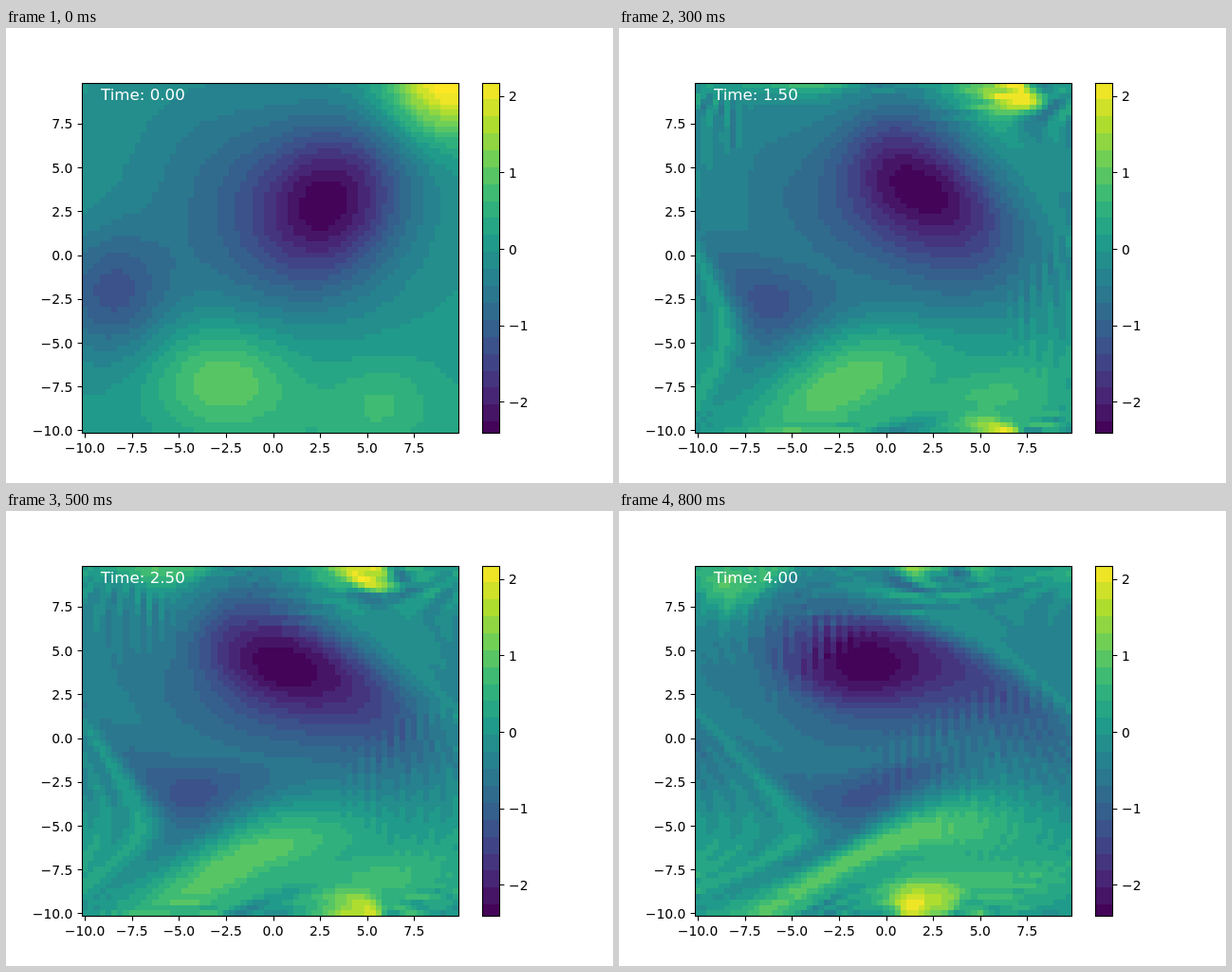
Write an HTML page with a canvas that moves like this. It is 640x480 px and loops after 900 ms.

```html
<!DOCTYPE html>
<html lang="en">
<head>
<meta charset="utf-8">
<title>Vorticity field</title>
<style>
  html, body { margin: 0; width: 100%; height: 100%; overflow: hidden; background: #fff; }
  canvas, svg { position: absolute; left: 0; top: 0; width: 640px; height: 480px; }
  text { font-family: "DejaVu Sans", sans-serif; font-size: 13.89px; }
  #time { font-size: 16.67px; fill: #fff; }
</style>
</head>
<body>
<canvas id="field" width="640" height="480"></canvas>
<svg id="axes" viewBox="0 0 640 480">
  <g fill="none" stroke="#000" stroke-width="1.11">
    <rect x="80.5" y="58.5" width="397" height="369"/>
    <rect x="502.5" y="58.5" width="18" height="369"/>
    <path id="ticks"/>
  </g>
  <g id="labels"></g>
  <text id="time" x="100" y="76"></text>
</svg>
<script>
const N = 64, L = 20, H = L / N, SIZE = N * N;
const VISCOSITY = 0.001;
const FRAME_MS = 100, FRAMES = 9, FRAME_TIME = 0.5, SUBSTEPS = 8;
const BOX = { left: 80, top: 57.6, right: 476.8, bottom: 427.2 };
const VMIN = -2.41, VMAX = 2.175;
const BAND = 0.222, BAND_START = VMIN + 0.149;

const vortex = (strength, x, y, sx, sy = sx) => (px, py) =>
  strength * Math.exp(-(((px - x) / sx) ** 2 + ((py - y) / sy) ** 2) / 2);

const VORTICES = [
  vortex(-1.15, 2.5, 1.8, 2.6),
  vortex(-1.15, 3.9, 4.6, 2.6),
  vortex(-0.75, -0.5, 1, 4.5),
  vortex(-0.3, -3, 6, 3.5),
  vortex(-1.15, -8.6, -2.2, 2.1, 2.5),
  vortex(1.05, -2.8, -6.9, 2.6, 2.2),
  vortex(0.4, 4, -9, 5, 3),
  vortex(0.33, 5.8, -8.4, 1.6),
  vortex(2.4, 9.3, 10, 2.2)
];

function initialField() {
  return Float64Array.from({ length: SIZE }, (_, i) => {
    const x = (i % N) * H - L / 2, y = (i >> 6) * H - L / 2;
    return VORTICES.reduce((sum, f) => sum + f(x, y), 0);
  });
}

// In-place radix-2 transform of N entries with the given offset and stride
function fft(re, im, offset, stride) {
  const swap = (f, a, b) => { const t = f[a]; f[a] = f[b]; f[b] = t; };
  for (let i = 1, j = 0; i < N; i++) {
    let bit = N >> 1;
    for (; j & bit; bit >>= 1) j ^= bit;
    j ^= bit;
    if (i < j) {
      swap(re, offset + i * stride, offset + j * stride);
      swap(im, offset + i * stride, offset + j * stride);
    }
  }
  for (let half = 1; half < N; half *= 2) {
    for (let k = 0; k < half; k++) {
      const c = Math.cos(Math.PI * k / half), s = -Math.sin(Math.PI * k / half);
      for (let i = k; i < N; i += 2 * half) {
        const a = offset + i * stride, b = a + half * stride;
        const tr = re[b] * c - im[b] * s, ti = re[b] * s + im[b] * c;
        re[b] = re[a] - tr; im[b] = im[a] - ti;
        re[a] += tr; im[a] += ti;
      }
    }
  }
}

function fft2(re, im) {
  for (let i = 0; i < N; i++) fft(re, im, i * N, 1);
  for (let i = 0; i < N; i++) fft(re, im, i, N);
}

// Periodic Poisson solve for the stream function
function streamFunction(w) {
  const re = w.slice(), im = new Float64Array(SIZE);
  const wave = i => 2 * Math.PI / L * (i < N / 2 ? i : i - N);
  fft2(re, im);
  for (let i = 0; i < SIZE; i++) {
    const k2 = wave(i % N) ** 2 + wave(i >> 6) ** 2;
    const scale = k2 ? -1 / (k2 * SIZE) : 0;
    re[i] *= scale;
    im[i] *= scale;
  }
  fft2(im, re); // swapped parts give the inverse
  return re;
}

// Advection and diffusion with second-order central differences
function rate(w) {
  const psi = streamFunction(w), out = new Float64Array(SIZE);
  for (let y = 0; y < N; y++) {
    const row = y * N, up = ((y + 1) % N) * N, down = ((y + N - 1) % N) * N;
    for (let x = 0; x < N; x++) {
      const e = row + (x + 1) % N, o = row + (x + N - 1) % N, n = up + x, s = down + x;
      const i = row + x;
      const turn = (psi[e] - psi[o]) * (w[n] - w[s]) - (psi[n] - psi[s]) * (w[e] - w[o]);
      const spread = w[e] + w[o] + w[n] + w[s] - 4 * w[i];
      out[i] = (turn / 4 + VISCOSITY * spread) / (H * H);
    }
  }
  return out;
}

function rungeKutta(w, dt) {
  const shift = (k, s) => w.map((v, i) => v + s * k[i]);
  const a = rate(w);
  const b = rate(shift(a, dt / 2));
  const c = rate(shift(b, dt / 2));
  const d = rate(shift(c, dt));
  return w.map((v, i) => v + dt / 6 * (a[i] + 2 * (b[i] + c[i]) + d[i]));
}

function simulate() {
  const fields = [initialField()];
  while (fields.length < FRAMES) {
    let w = fields[fields.length - 1];
    for (let i = 0; i < SUBSTEPS; i++) w = rungeKutta(w, FRAME_TIME / SUBSTEPS);
    fields.push(w);
  }
  return fields;
}

const VIRIDIS = ["440154", "482878", "3e4a89", "31688e", "26828e",
                 "1f9e89", "35b779", "6ece58", "b5de2b", "fde725"]
  .map(hex => [0, 2, 4].map(i => parseInt(hex.slice(i, i + 2), 16)));

function color(value) {
  const mid = BAND_START + BAND * (Math.floor((value - BAND_START) / BAND) + 0.5);
  const s = 9 * Math.max(0, Math.min(1, (mid - VMIN) / (VMAX - VMIN)));
  const i = Math.min(8, Math.floor(s));
  const rgb = VIRIDIS[i].map((c, n) => Math.round(c + (VIRIDIS[i + 1][n] - c) * (s - i)));
  return `rgb(${rgb})`;
}

const ctx = document.getElementById("field").getContext("2d");
const timeLabel = document.getElementById("time");
const edgeX = i => Math.round(BOX.left + (BOX.right - BOX.left) * i / N);
const edgeY = j => Math.round(BOX.bottom - (BOX.bottom - BOX.top) * j / N);

function drawField(w) {
  for (let y = 0; y < N; y++) {
    for (let x = 0; x < N; x++) {
      ctx.fillStyle = color(w[y * N + x]);
      ctx.fillRect(edgeX(x), edgeY(y + 1), edgeX(x + 1) - edgeX(x), edgeY(y) - edgeY(y + 1));
    }
  }
}

function drawColorbar() {
  for (let y = 58; y < 428; y++) {
    ctx.fillStyle = color(VMIN + (VMAX - VMIN) * (BOX.bottom - y - 0.5) / (BOX.bottom - BOX.top));
    ctx.fillRect(502, y, 18, 1);
  }
}

function drawAxes() {
  let path = "", text = "";
  const label = (x, y, anchor, s) => {
    text += `<text x="${x}" y="${y}" text-anchor="${anchor}">${s.replace("-", "\u2212")}</text>`;
  };
  const snap = v => Math.round(v) + 0.5;
  const middle = y => Math.round(y + 5.6);
  for (let v = -10; v <= 7.5; v += 2.5) {
    const x = 83.1 + (v + 10) * 19.84, y = 424.3 - (v + 10) * 18.48;
    path += `M${snap(x)} 427.5v4.9M80.5 ${snap(y)}h-4.9`;
    label(x, 448, "middle", v.toFixed(1));
    label(70.3, middle(y), "end", v.toFixed(1));
  }
  for (let v = -2; v <= 2; v++) {
    const y = BOX.bottom - (v - VMIN) * 80.6;
    path += `M520.5 ${snap(y)}h4.9`;
    label(530, middle(y), "start", String(v));
  }
  document.getElementById("ticks").setAttribute("d", path);
  document.getElementById("labels").innerHTML = text;
}

const fields = simulate();
let shown = -1;

function render(ms) {
  const step = Math.floor(ms / FRAME_MS) % FRAMES;
  if (step === shown) return;
  shown = step;
  drawField(fields[step]);
  timeLabel.textContent = "Time: " + (step * FRAME_TIME).toFixed(2);
}

drawColorbar();
drawAxes();
const start = performance.now();
function tick() {
  render(Math.max(0, performance.now() - start));
  requestAnimationFrame(tick);
}
tick();
</script>
</body>
</html>
```
